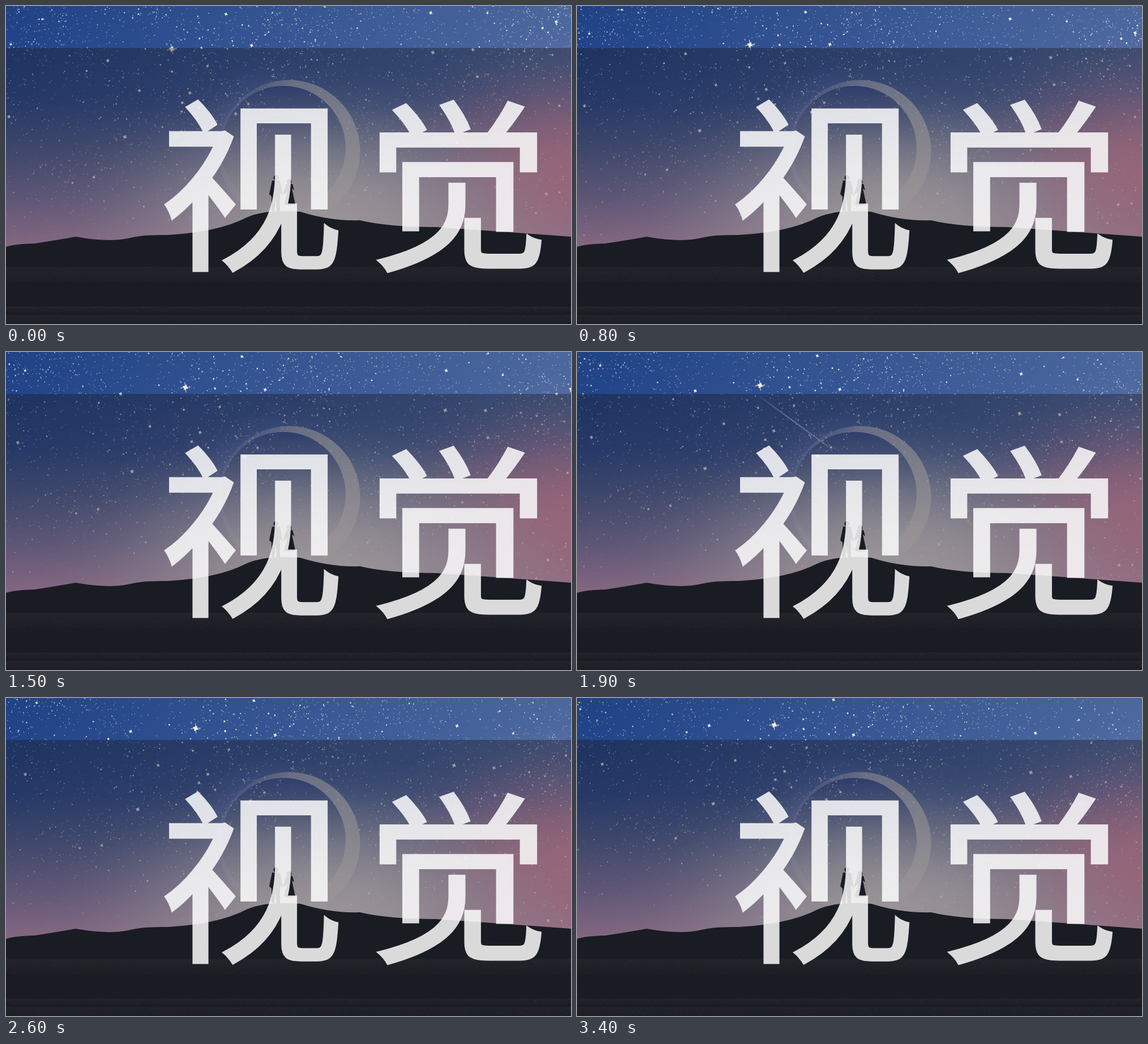
These frames come from a looping animation (998 by 561 pixels, 3.5 s). An HTML page with a canvas:

```html
<!DOCTYPE html>
<html lang="zh-CN">
<head>
<meta charset="utf-8">
<style>
html, body { margin: 0; width: 998px; height: 561px; overflow: hidden; background: #1b1e25; }
canvas, svg { position: absolute; left: 0; top: 0; }
text { font: 400 326px "Noto Sans CJK SC", "Noto Sans CJK", sans-serif; fill: #fff; stroke: #fff; stroke-width: 5; }
</style>
</head>
<body>
<canvas width="998" height="561"></canvas>
<svg width="998" height="561"><g opacity=".84"><text x="270" y="441">视</text><text x="635" y="441">觉</text></g></svg>
<script>
const W = 998, H = 561, LOOP = 3500, STEP = 100;
const PIVOT = { x: 487, y: 388 }, TURN = Math.PI / 18;
const ctx = document.querySelector('canvas').getContext('2d');

let seed = 7;
const rand = () => {
  seed = (seed + 0x6D2B79F5) | 0;
  let n = Math.imul(seed ^ seed >>> 15, 1 | seed);
  n = n + Math.imul(n ^ n >>> 7, 61 | n) ^ n;
  return ((n ^ n >>> 14) >>> 0) / 4294967296;
};
const between = (a, b) => a + (b - a) * rand();
const many = (count, make) => Array.from({ length: count }, make);

// Colours are spread evenly along a gradient.
const spread = (g, colors) => {
  colors.forEach((color, i) => g.addColorStop(i / (colors.length - 1), color));
  return g;
};
const linear = (x0, y0, x1, y1, ...colors) => spread(ctx.createLinearGradient(x0, y0, x1, y1), colors);

function fillRect(style, x = 0, y = 0, w = W, h = H) {
  ctx.fillStyle = style;
  ctx.fillRect(x, y, w, h);
}

function fillCircle(style, x, y, r) {
  ctx.fillStyle = style;
  ctx.beginPath();
  ctx.arc(x, y, r, 0, 2 * Math.PI);
  ctx.fill();
}

// Soft elliptical light, fading with a smooth falloff.
function glow(x, y, rx, ry, rgb, strength) {
  ctx.save();
  ctx.translate(x, y);
  ctx.scale(rx, ry);
  const colors = many(9, (_, i) => `rgba(${rgb},${strength * (1 + Math.cos(Math.PI * i / 8)) / 2})`);
  fillCircle(spread(ctx.createRadialGradient(0, 0, 0, 0, 0, 1), colors), 0, 0, 1);
  ctx.restore();
}

// Stars thin out toward the horizon and gather in loose drifts.
function makeStar() {
  for (;;) {
    const x = between(-80, 1080), y = between(-150, 440);
    const drift = .6 + .25 * Math.sin(x / 71 + y / 53) + .15 * Math.sin(x / 33 - y / 41);
    if (rand() < drift * Math.min(1, (470 - y) / 330)) {
      return { x, y, size: 1 + 1.5 * rand() ** 4, alpha: between(.3, .95) };
    }
  }
}
const dust = many(6000, makeStar);
const bright = many(75, () => ({ ...makeStar(), size: between(1.6, 3) }));
const lead = { x: 293, y: 76, size: 4.6 };
bright.push(lead, { x: 754, y: 82, size: 3.4 }, { x: 210, y: 231, size: 3.2 }, { x: 972, y: 28, size: 3 });

const meteors = [
  { x: 708, y: 110, peak: 400, strength: .5 },
  { x: 130, y: 0, peak: 1100, strength: .9 },
  { x: 322, y: 78, peak: 1900, strength: .8 }
];

const bands = [{ y: 460, h: 27 }, { y: 530, h: 10 }, { y: 545, h: 16 }, { y: 420, h: 140 }];
const grain = many(3000, (_, i) => {
  const { y, h } = bands[i % bands.length];
  return { x: rand() * W, y: y + rand() * h, alpha: between(.03, .11) };
});

const hill = new Path2D(`M0 425Q14 420 50 419Q90 413 123 407Q180 417 215 410Q240 403 285 404Q375 399 425 373
  Q460 358 520 363Q575 380 625 378Q675 390 760 390Q890 399 998 407V561H0Z`);

function drawSky() {
  fillRect(linear(0, 0, 0, 425, '#1f4284', '#22448a', '#2d4b92', '#556399', '#8a7bab', '#c898bd'));
  fillRect(linear(0, 0, W, 0, 'rgba(255,255,255,0)', 'rgba(255,255,255,.2)'));
  glow(1010, 290, 400, 250, '250,150,175', .8);
}

function drawMoon() {
  glow(470, 235, 150, 150, '95,125,215', .8);
  fillCircle(linear(380, 170, 570, 250, 'rgba(110,130,195,.3)', 'rgba(172,176,200,.8)', 'rgba(200,200,205,.75)'), 500, 256, 125.5);
  fillCircle(linear(0, 141, 0, 362, '#344f96', '#4f6199', '#757ba6', '#a29fb5'), 490, 251, 110);
  glow(560, 395, 500, 295, '236,228,226', .95);
}

function sparkle({ x, y, size }) {
  ctx.beginPath();
  for (let i = 0; i < 8; i++) {
    const a = i * Math.PI / 4 + .3, d = size * (i % 2 ? .65 : 1.25);
    ctx.lineTo(x + d * Math.cos(a), y + d * Math.sin(a));
  }
  ctx.fill();
}

function drawStars(t) {
  ctx.save();
  ctx.translate(PIVOT.x, PIVOT.y);
  ctx.rotate(TURN * t / LOOP);
  ctx.translate(-PIVOT.x, -PIVOT.y);
  ctx.fillStyle = ctx.strokeStyle = '#fff8ec';
  for (const { x, y, size, alpha } of dust) {
    ctx.globalAlpha = alpha;
    ctx.fillRect(x - size / 2, y - size / 2, size, size);
  }
  ctx.globalAlpha = .9;
  bright.forEach(sparkle);
  // Long rays of the leading star
  ctx.beginPath();
  for (let i = 0; i < 4; i++) {
    const a = i * Math.PI / 2 - .2;
    ctx.moveTo(lead.x, lead.y);
    ctx.lineTo(lead.x + 9 * Math.cos(a), lead.y + 9 * Math.sin(a));
  }
  ctx.stroke();
  ctx.restore();
}

function drawMeteors(t) {
  const length = 150, angle = .63, speed = .45, life = 600;
  for (const { x, y, peak, strength } of meteors) {
    const age = t - peak;
    if (Math.abs(age) >= life / 2) continue;
    ctx.save();
    ctx.translate(x, y);
    ctx.rotate(angle);
    ctx.globalAlpha = strength * Math.cos(age / life * Math.PI);
    fillRect(linear(age * speed, 0, age * speed + length, 0, 'rgba(215,220,255,.2)', 'rgba(225,228,255,.8)', 'rgba(225,228,255,.5)'),
      age * speed, -1, length, 2);
    ctx.restore();
  }
}

function drawCouple() {
  const ink = '#1a1d24';
  fillCircle(ink, 477, 303, 4.5);
  fillCircle(ink, 500, 310, 4.5);
  ctx.fill(new Path2D('M470 308H484L489 335L484 330V362H478L476 338L474 362H469V336L465 332Z'));
  ctx.fill(new Path2D('M495 314H506L509 325L505 322L511 350Q500 353 491 350L497 328L489 334Z'));
}

function drawGround() {
  drawCouple();
  ctx.fill(hill);
  for (const { y, h } of bands.slice(0, 3)) {
    fillRect(linear(0, y, 0, y + h, 'rgba(150,150,145,.1)', 'rgba(150,150,145,.03)'), 0, y, W, h);
  }
  for (const { x, y, alpha } of grain) fillRect(`rgba(200,200,190,${alpha})`, x, y, 1.3, 1.3);
}

let shown = -1;
function frame(now) {
  const t = Math.floor(now % LOOP / STEP) * STEP;
  if (t !== shown) {
    shown = t;
    drawSky();
    drawMoon();
    drawStars(t);
    drawMeteors(t);
    drawGround();
    fillRect('rgba(26,28,35,.39)', 0, 74, W, H - 74);
  }
  requestAnimationFrame(frame);
}
frame(0);
</script>
</body>
</html>
```
